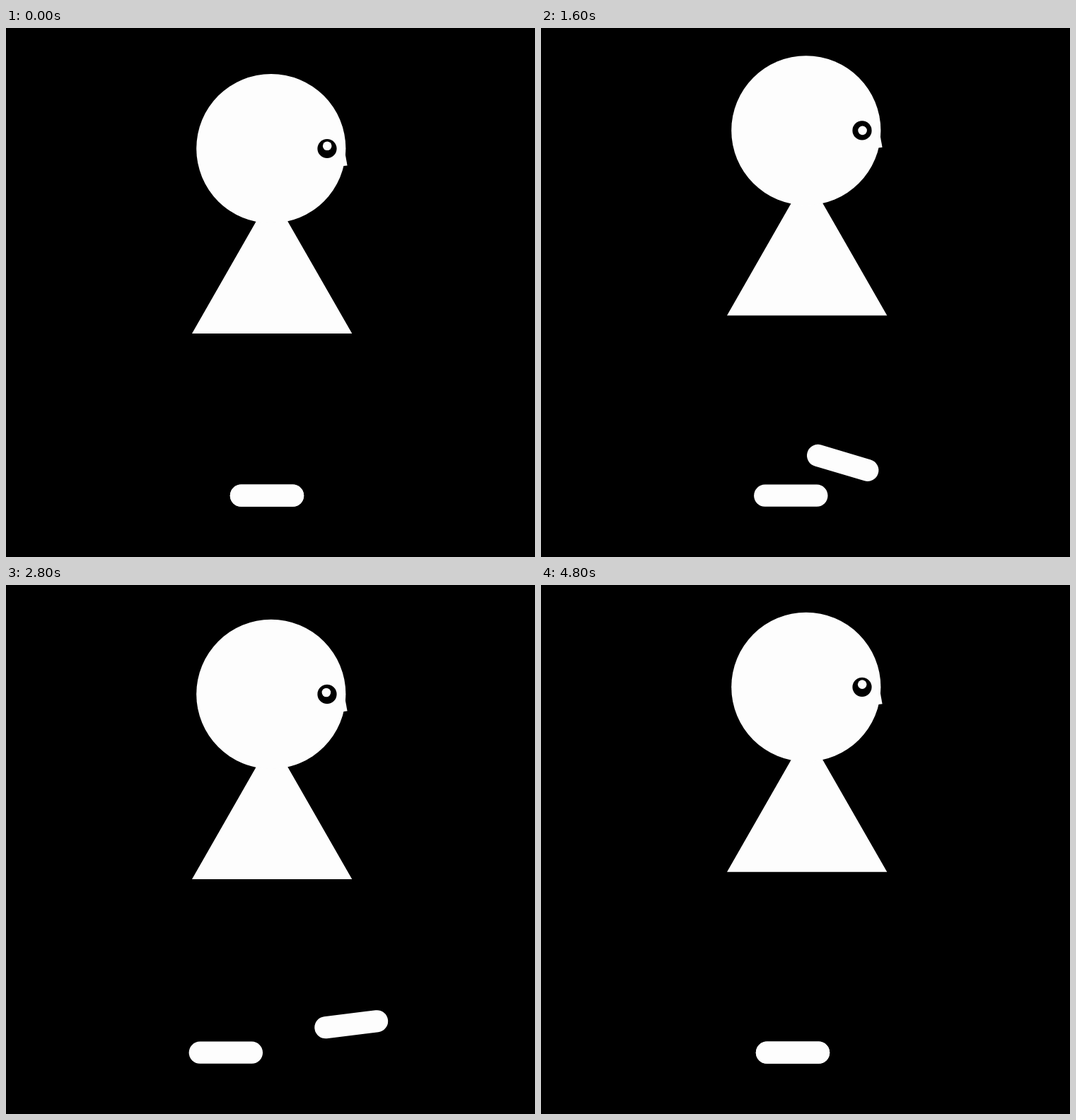
Animation of 748 by 748 pixels, one loop 5040 ms. Source, as an HTML page:

```html
<!DOCTYPE html>
<html lang="en">
<head>
<meta charset="utf-8">
<title>Walk</title>
<style>
  html, body { margin: 0; width: 100%; height: 100%; overflow: hidden; background: #000; }
  svg { display: block; width: 100vw; height: 100vh; }
</style>
</head>
<body>
<svg viewBox="0 0 748 748" fill="#fdfdfd">
  <g id="body">
    <path d="M376 234.5 489.3 432H263Z"/>
    <circle cx="374.8" cy="170.5" r="105.6"/>
    <path d="M479.3 176 482.6 194.4 470 195.8Z"/>
    <circle cx="454" cy="170.5" r="13.6" fill="#000"/>
    <circle id="glint" cx="454.2" cy="170.5" r="6.3"/>
  </g>
  <rect id="footA" x="-52.2" y="-15.6" width="104.4" height="31.2" rx="15.6"/>
  <rect id="footB" x="-52.2" y="-15.6" width="104.4" height="31.2" rx="15.6"/>
</svg>
<script>
const LOOP = 5040, LAST = 144, STEP = 30, GROUND = 661.2;
const BACK = 266, FRONT = 514, START = 369, END = 356;
const get = id => document.getElementById(id);
const clamp = v => Math.min(1, Math.max(0, v));

const linear = u => u;
const smooth = u => u * u * (3 - 2 * u);
const pushOff = u => smooth(u) + 0.6 * u * u * (u - 1);

// Keys: [frame, value, easing towards the next key]
function tween(keys, f) {
  let i = 0;
  while (i < keys.length - 2 && f >= keys[i + 1][0]) i++;
  const [t0, a, ease = smooth] = keys[i], [t1, b] = keys[i + 1];
  return a + (b - a) * ease(clamp((f - t0) / (t1 - t0)));
}

// Smooth curve through [x, y] points, flat at both ends
function spline(pts, x) {
  const n = pts.length - 1;
  if (x <= pts[0][0]) return pts[0][1];
  if (x >= pts[n][0]) return pts[n][1];
  let i = 0;
  while (x >= pts[i + 1][0]) i++;
  const slope = k => k === 0 || k === n ? 0
    : (pts[k + 1][1] - pts[k - 1][1]) / (pts[k + 1][0] - pts[k - 1][0]);
  const [x0, a] = pts[i], [x1, b] = pts[i + 1], d = x1 - x0, u = (x - x0) / d;
  return a + (b - a) * smooth(u)
    + d * u * (1 - u) * ((1 - u) * slope(i) - u * slope(i + 1));
}

const feet = [
  { el: get("footA"), lifts: [30, 90],
    x: [[0, START, linear], [29, 265], [30, BACK], [60, FRONT, pushOff],
        [90, BACK], [120, FRONT], [130, END]] },
  { el: get("footB"), lifts: [0, 60],
    x: [[0, START], [30, FRONT], [60, BACK], [90, FRONT], [130, END]] }
];

// One swing of a foot, in parts of a step
const lift = [[0, 0], [0.167, 12.7], [0.4, 36], [0.667, 47.6], [0.8, 40], [0.9, 24], [1, 5], [1.13, 0]];
const tilt = [[0, 0], [0.167, 8], [0.45, 18], [0.667, 13], [0.8, -7], [0.9, -10.3], [1, -7.7], [1.13, 0]];

const HEIGHT = 26.2;
const bounce = [[0, 0], [5, 0.48], [10, 0.94], [15, 1], [20, 0.92], [24, 0.615], [27, 0.173], [30, 0]];
const glintX = [[0, 0], [35, 5], [60, -3.7], [100, 0], [117, -4], [144, 0]];
const glintY = [[0, -3.7], [35, 0], [60, 0], [100, -3.7], [117, 0], [144, -3.7]];

function draw(f) {
  const rise = f < 120 ? spline(bounce, f % STEP) : smooth(clamp((f - 120) / 15));
  get("body").setAttribute("transform", `translate(0 ${-HEIGHT * rise})`);
  get("glint").setAttribute("transform", `translate(${tween(glintX, f)} ${tween(glintY, f)})`);
  for (const { el, lifts, x } of feet) {
    const from = lifts.filter(s => s <= f).pop();
    const u = from === undefined ? 0 : (f - from) / STEP;
    el.setAttribute("transform",
      `translate(${tween(x, f)} ${GROUND - spline(lift, u)}) rotate(${spline(tilt, u)})`);
  }
}

// Thirty pictures a second, each starting on a 10 ms tick
const frameAt = ms => Math.min(LAST, Math.floor((Math.floor(ms / 10) + 0.5) * 0.3));

const begin = performance.now();
function tick() {
  draw(frameAt((performance.now() - begin) % LOOP));
  requestAnimationFrame(tick);
}
tick();
</script>
</body>
</html>
```
